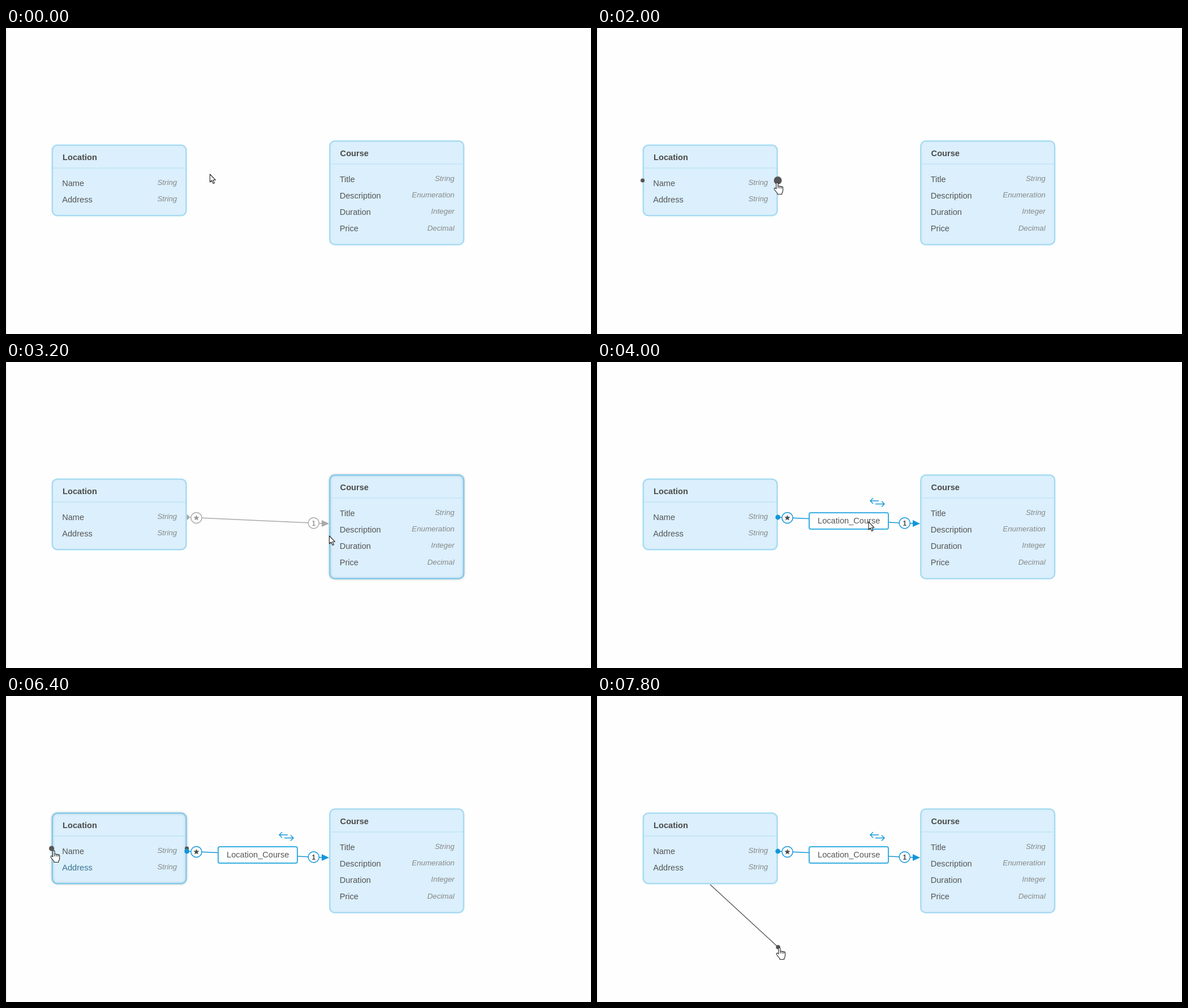
Recreate the animation shown at these times as an HTML page with a canvas. Size 1034 px wide and 542 px high, loop 8 s.

```html
<!DOCTYPE html>
<html lang="en">
<head>
<meta charset="utf-8">
<title>Entity association</title>
<style>
  html, body { margin: 0; width: 100%; height: 100%; overflow: hidden; background: #fefefe; }
  canvas { display: block; }
</style>
</head>
<body>
<canvas id="stage" width="1034" height="542"></canvas>
<script>
const ctx = document.getElementById('stage').getContext('2d');
const LOOP = 8000, STEP = 200;
const FONT = '"Liberation Sans", Arial, sans-serif';
const DARK = '#555', BLUE = '#1496d8', GREY = '#a9a9a9';

// Pointer path: time, x, y
const pointerPath = [
  [0, 360.5, 259], [600, 360.5, 259], [1200, 320.5, 275], [1400, 320.5, 275],
  [1800, 318.5, 274], [2200, 318.5, 274], [2400, 350, 277], [2600, 420, 288],
  [3000, 569, 309], [3200, 571.5, 308], [3600, 571.5, 308], [4000, 480, 283],
  [4200, 480, 283], [4600, 404.5, 407], [5400, 404.5, 407], [6000, 180, 320],
  [6200, 115, 303], [6400, 84.5, 274], [6800, 84.5, 274], [7000, 60, 292],
  [7200, 53, 359], [7400, 120, 425], [7600, 230, 449], [7800, 322.5, 446]
];

const arrowShape = new Path2D('M0 0V14L3.2 11L5.7 16.5L8 15.5L5.6 10.3H10Z');
const handShape = new Path2D(
  'M-1.7 11V1.2a1.6 1.6 0 0 1 3.2 0V7q.4-1.2 1.7-1.2 1.4 0 1.4 1.4 .3-.9 1.5-.9 1.4 0 1.4 1.4' +
  ' .4-.6 1.3-.6 1.3 0 1.3 1.5V14q0 2.5-1.8 4.5V20.5H.5V19Q-2 16-5 12q-1-1.5 .2-2.4 1.4-.7 3.1 1.4Z' +
  'M1.5 7V10M4.6 7.2V10.2M7.5 7.7V10.5');
const swapShape = new Path2D('M488 241L483 246L488 251M483 246H498M503 246.5L508 251.5L503 256.5M508 251.5H492');

const between = (t, from, to) => t >= from && t < to;

function pointerAt(t) {
  const i = pointerPath.findIndex(p => p[0] > t);
  if (i < 0) return pointerPath.at(-1).slice(1);
  const [t0, x0, y0] = pointerPath[i - 1], [t1, x1, y1] = pointerPath[i];
  const k = (t - t0) / (t1 - t0);
  return [x0 + (x1 - x0) * k, y0 + (y1 - y0) * k];
}

function text(str, x, y, color, style = '14.6px', align = 'left') {
  ctx.font = `${style} ${FONT}`;
  ctx.textAlign = align;
  ctx.fillStyle = color;
  ctx.fillText(str, x, y);
}

function line(x0, y0, x1, y1, color, width) {
  ctx.beginPath();
  ctx.moveTo(x0, y0);
  ctx.lineTo(x1, y1);
  ctx.strokeStyle = color;
  ctx.lineWidth = width;
  ctx.stroke();
}

function disc(x, y, r, fill, stroke) {
  ctx.beginPath();
  ctx.arc(x, y, r, 0, 2 * Math.PI);
  ctx.fillStyle = fill;
  ctx.fill();
  if (stroke) {
    ctx.strokeStyle = stroke;
    ctx.lineWidth = 1.5;
    ctx.stroke();
  }
}

function panel(x, y, w, h, r, fill, stroke, width) {
  ctx.beginPath();
  ctx.roundRect(x + width / 2, y + width / 2, w - width, h - width, r);
  ctx.fillStyle = fill;
  ctx.fill();
  ctx.strokeStyle = stroke;
  ctx.lineWidth = width;
  ctx.stroke();
}

function entity(x, y, h, title, fields, hover, fieldColor = () => DARK) {
  ctx.save();
  if (hover) {
    ctx.shadowColor = 'rgba(0,0,0,.15)';
    ctx.shadowBlur = 4;
  }
  panel(x, y, 239.3, h, 9, '#dbeffc', hover ? '#82cbec' : '#a8dbf2', 2.6);
  ctx.restore();
  line(x + 2.6, y + 41.9, x + 236.7, y + 41.9, '#b4dfee', 1);
  text(title, x + 19.6, y + 28, '#4b4b4b', 'bold 14.6px');
  fields.forEach(([name, type], i) => {
    text(name, x + 18.7, y + 73.5 + 29.2 * i, fieldColor(name));
    text(type, x + 221.7, y + 72 + 29.2 * i, '#888', 'italic 13.3px', 'right');
  });
}

function star(x, y, r, color) {
  ctx.beginPath();
  for (let i = 0; i < 10; i++) {
    const a = Math.PI * (i / 5 - .5), d = i % 2 ? r * .45 : r;
    ctx.lineTo(x + d * Math.cos(a), y + d * Math.sin(a));
  }
  ctx.fillStyle = color;
  ctx.fill();
}

function connector(selected) {
  const color = selected ? BLUE : GREY, mark = selected ? '#4d4d4d' : '#999';
  line(320, 275, 560, 286, color, selected ? 1.7 : 1.3);
  disc(319.7, 275, 4.4, color);
  disc(336.5, 276, 9.6, '#fefefe', color);
  star(336.5, 276.2, 5.3, mark);
  disc(543.8, 285.3, 9.6, '#fefefe', color);
  text('1', 543.8, 289.7, mark, 'bold 12px', 'center');
  ctx.beginPath();
  ctx.moveTo(558, 280);
  ctx.lineTo(571, 286.2);
  ctx.lineTo(558, 292);
  ctx.fillStyle = color;
  ctx.fill();
  if (!selected) return;
  panel(374, 266, 142, 31, 3, '#fff', '#37aee2', 2);
  text('Location_Course', 445.2, 286, DARK, '14.6px', 'center');
  ctx.strokeStyle = BLUE;
  ctx.lineWidth = 1.4;
  ctx.stroke(swapShape);
}

function handleRadius(t, start) {
  return t < start ? 3.6 : Math.min(7, 4.6 + (t - start) / STEP * 2.4);
}

function pointer(x, y, shape) {
  ctx.save();
  ctx.translate(x, y);
  ctx.fillStyle = '#fff';
  ctx.strokeStyle = '#222';
  ctx.lineWidth = 1.1;
  ctx.lineJoin = 'round';
  ctx.fill(shape);
  ctx.stroke(shape);
  ctx.restore();
}

function draw(t) {
  const [x, y] = pointerAt(t);
  const dragRight = between(t, 2400, 3200), dragNew = t >= 7000;
  const handlesRight = between(t, 1600, 2400), handlesLeft = between(t, 6000, 7000);
  const linked = t >= 3200, selected = t >= 4000;

  ctx.fillStyle = '#fefefe';
  ctx.fillRect(0, 0, 1034, 542);
  ctx.fillStyle = '#f2f2f2';
  ctx.fillRect(0, 0, 2, 542);

  if (linked && !selected) connector(false);
  entity(80.5, 206.2, 127.4, 'Location', [['Name', 'String'], ['Address', 'String']], handlesLeft,
    name => name !== 'Address' ? DARK : t === 6200 ? BLUE : t === 6400 ? '#3b7390' : DARK);
  entity(571, 199, 186, 'Course',
    [['Title', 'String'], ['Description', 'Enumeration'], ['Duration', 'Integer'], ['Price', 'Decimal']],
    between(t, 3000, 3800));

  if (handlesRight || handlesLeft) {
    disc(80.6, 270, handlesLeft ? handleRadius(t, 6400) : 3.6, DARK);
    disc(319.6, 270, handlesRight ? handleRadius(t, 1800) : 3.6, DARK);
  }
  if (selected) connector(true);

  if (dragRight || dragNew) {
    const [ax, ay] = dragRight ? [320, 270] : t < 7400 ? [81, 270] : [200, 334];
    line(ax, ay, x - 2.5, y - 1.3, DARK, 1.3);
    disc(x - 2.5, y - 1.3, 3.8, DARK);
  }
  const hand = between(t, 1800, 3200) || t >= 6400;
  pointer(x, y, hand ? handShape : arrowShape);
}

function tick() {
  draw(Math.floor(performance.now() % LOOP / STEP) * STEP);
  requestAnimationFrame(tick);
}
tick();
</script>
</body>
</html>
```
